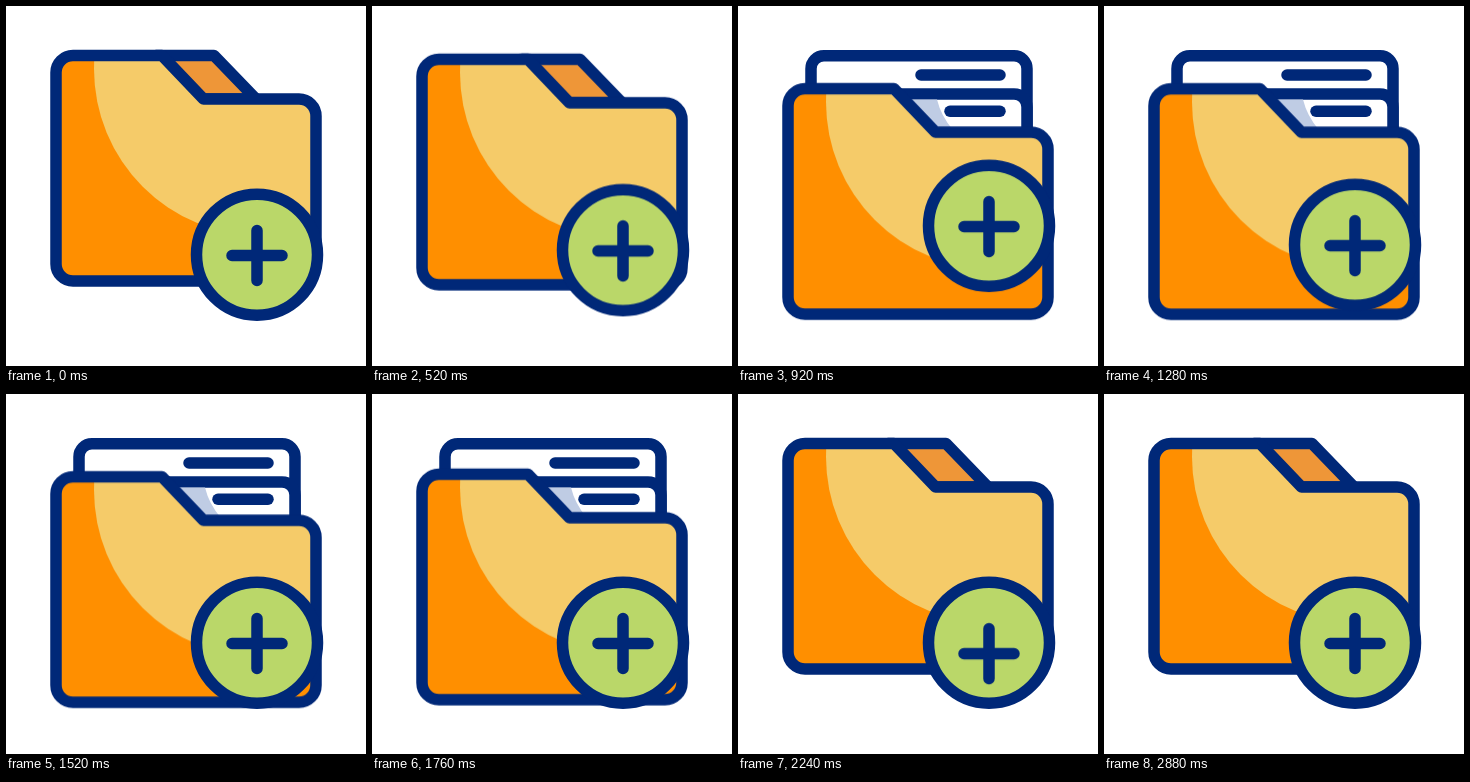
Animation of 360 by 360 pixels, one loop 3000 ms. Source, as an HTML page:

```html
<!DOCTYPE html>
<html lang="en">
<head>
<meta charset="utf-8">
<title>Add to folder</title>
<style>
  html, body { margin: 0; width: 100%; height: 100%; overflow: hidden; background: #fff; }
  svg { display: block; width: 100%; height: 100%; }
  .ink { stroke: #002878; stroke-width: 11.5; stroke-linecap: round; stroke-linejoin: round; }
</style>
</head>
<body>
<svg viewBox="0 0 360 360">
  <defs>
    <path id="shape" d="M67 49.5H156L197.5 93H293a17 17 0 0 1 17 17V258a17 17 0 0 1 -17 17H67a17 17 0 0 1 -17 -17V66.5a17 17 0 0 1 17 -17Z"/>
    <clipPath id="inside"><use href="#shape"/></clipPath>
  </defs>

  <path id="back" class="ink" fill="#ee9638" d="M150 49.5H208L250 93H192Z"/>

  <g id="cards">
    <rect class="ink" fill="#fff" x="73" y="49.7" width="216" height="170" rx="13"/>
    <path class="ink" d="M183 69H262"/>
    <rect class="ink" fill="#fff" x="110" y="88" width="179" height="130" rx="13"/>
    <path fill="#bfcce4" d="M140 93.5H199Q203 110 215 124H140Z"/>
    <path class="ink" d="M212 105.3H262"/>
  </g>

  <g id="front">
    <use href="#shape" fill="#ff8f00"/>
    <circle cx="254.5" cy="63" r="166.5" fill="#f5cb69" clip-path="url(#inside)"/>
    <use href="#shape" class="ink" fill="none"/>
  </g>

  <g id="badge">
    <circle class="ink" cx="251" cy="248.7" r="60.5" fill="#bad769"/>
    <path id="plus" class="ink" d="M226 249.5h50m-25 -25v50"/>
  </g>
</svg>
<script>
  const LOOP = 3000;

  // Ease a part from rest to moved at `out`, then home again at `back`.
  function swing(id, { rest = 0, moved = 0, out, back, time }) {
    const key = (at, y) => ({
      offset: at / LOOP,
      transform: `translateY(${y}px)`,
      easing: 'cubic-bezier(.333, 0, .667, 1)'
    });
    document.getElementById(id).animate([
      key(0, rest), key(out, rest), key(out + time, moved),
      key(back, moved), key(back + time, rest), key(LOOP, rest)
    ], { duration: LOOP, iterations: Infinity });
  }

  for (const id of ['back', 'front'])
    swing(id, { moved: 33.3, out: 410, back: 1670, time: 530 });
  swing('cards', { rest: 52, out: 460, back: 1760, time: 460 });
  swing('badge', { moved: -29, out: 380, back: 940, time: 560 });
  swing('plus', { moved: 10.3, out: 1760, back: 2320, time: 520 });
</script>
</body>
</html>
```
